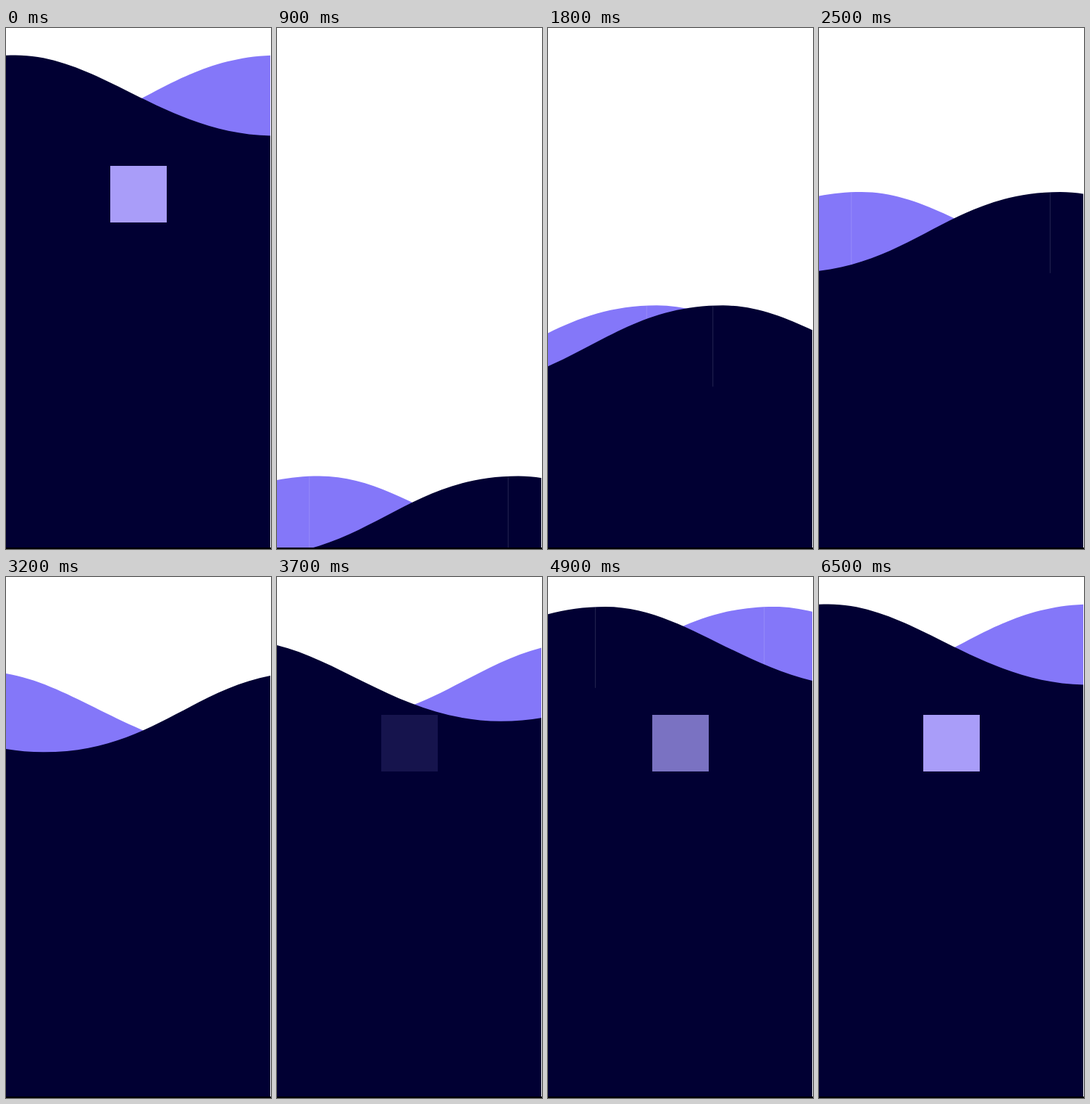
Animation of 366 by 718 pixels, one loop 8 s. Source, as an HTML page:

```html
<!DOCTYPE html>
<html lang="en">
<head>
<meta charset="utf-8">
<title>Rising waves</title>
<style>
  html, body { margin: 0; width: 100%; height: 100%; overflow: hidden; background: #fff; }
  svg { display: block; width: 366px; height: 718px; }
</style>
</head>
<body>
<svg viewBox="0 0 366 718">
  <g id="back" fill="#8477f9"></g>
  <g id="front" fill="#010033"></g>
  <rect id="badge" x="144" y="190" width="78" height="78" fill="#a99df9"/>
  <rect x="365" width="1" height="716" fill="#fff"/>
  <rect y="716" width="366" height="2" fill="#000"/>
</svg>
<script>
  const LOOP = 8000, STEP = 100, RESTART = 500;
  const TILE = 732, REST_Y = 37.5, RISE = 625, RISE_START = 488, RISE_TIME = 4890;
  const DRIFT_START = 450, CYCLE = 800, LAST_CYCLE = 3650, DRIFT_END = 5800, DECAY = 570;
  const FADE_START = 3450, FADE_TIME = 2000;

  const byId = id => document.getElementById(id);
  const clamp = v => Math.min(1, Math.max(0, v));
  const bezier = (s, a, b) => 3 * (1 - s) ** 2 * s * a + 3 * (1 - s) * s * s * b + s ** 3;

  // CSS "ease" curve
  function ease(x) {
    let lo = 0, hi = 1;
    for (let i = 0; i < 24; i++) {
      const mid = (lo + hi) / 2;
      if (bezier(mid, 0.25, 0.25) < x) lo = mid; else hi = mid;
    }
    return bezier(lo, 0.1, 1);
  }

  // Three tiles in a row, each running from crest to crest
  function wavePath() {
    let d = 'M-718 0';
    for (const x of [-TILE, 0, TILE]) {
      d += `C${x + 132} 0 ${x + 222} 111 ${x + 373} 111`;
      d += `S${x + 588} 0 ${x + 746} 0`.replace('S', `C${x + 538} 111 `);
    }
    return d + 'V700H-718Z';
  }

  function buildWave(group) {
    const seams = [0, TILE].map(x => `M${x} 1V112`).join('');
    group.innerHTML = `<path d="${wavePath()}"/>` +
      `<path class="seam" d="${seams}" stroke="#fff" stroke-opacity=".15"/>`;
  }

  // Steady cycles, then one last cycle that slows to rest
  function cyclesAt(t) {
    if (t < LAST_CYCLE) return (t - DRIFT_START) / CYCLE;
    if (t >= DRIFT_END) return 5;
    const tail = Math.exp((LAST_CYCLE - DRIFT_END) / DECAY);
    return 5 - (Math.exp((LAST_CYCLE - t) / DECAY) - tail) / (1 - tail);
  }

  function place(group, seam, y, moving) {
    const x = ((seam % TILE) + TILE) % TILE - TILE;
    group.setAttribute('transform', `translate(${x} ${y})`);
    group.querySelector('.seam').style.display = moving ? '' : 'none';
  }

  const back = byId('back'), front = byId('front'), badge = byId('badge');
  [back, front].forEach(buildWave);

  function draw(now) {
    let t = Math.floor((now % LOOP) / STEP) * STEP;
    if (t < RESTART) t = LOOP;
    const y = REST_Y + RISE * (1 - ease(clamp((t - RISE_START) / RISE_TIME)));
    const seam = -1 - TILE * cyclesAt(t);
    const moving = t < DRIFT_END;
    place(front, seam, y, moving);
    place(back, 364 - seam, y, moving);
    badge.setAttribute('opacity', clamp((t - FADE_START) / FADE_TIME));
  }

  const start = performance.now();
  function tick() {
    draw(performance.now() - start);
    requestAnimationFrame(tick);
  }
  tick();
</script>
</body>
</html>
```
